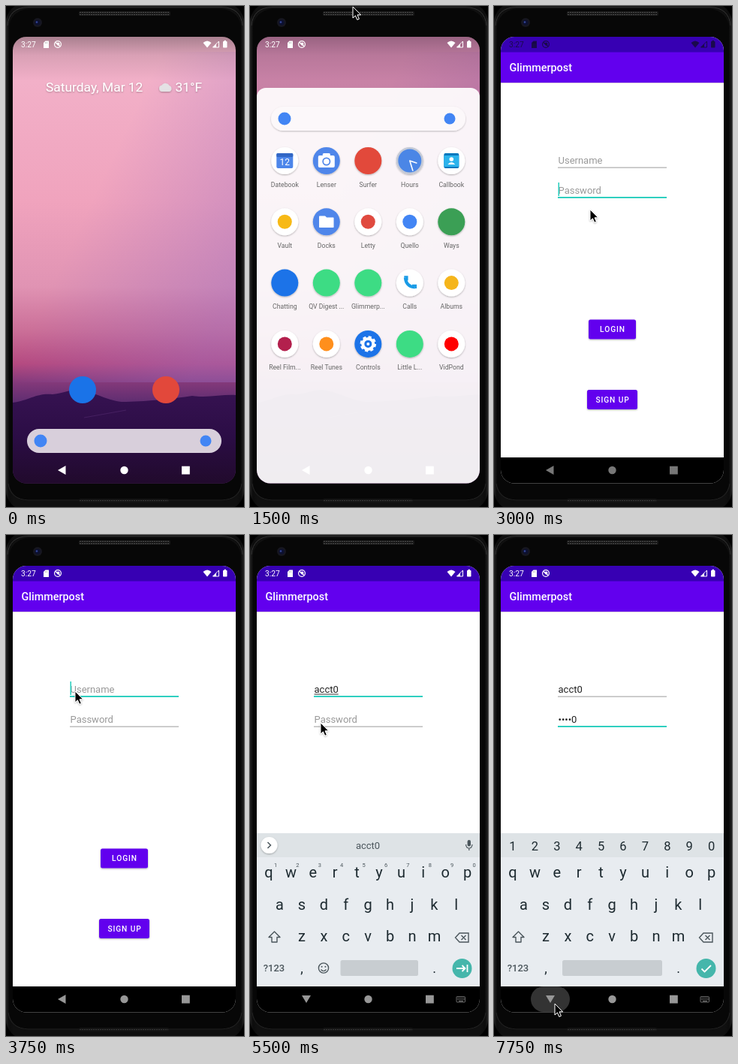
Write an HTML page that moves like this. It is 317x667 px and loops after 8 s.

```html
<!DOCTYPE html>
<html lang="en">
<head>
<meta charset="utf-8">
<title>Login demo</title>
<style>
html, body { margin: 0; width: 100%; height: 100%; overflow: hidden; background: #000; }
svg { display: block; width: 317px; height: 667px; font-family: Roboto, sans-serif; }
</style>
</head>
<body>
<svg id="stage" viewBox="0 0 317 667">
  <defs>
    <clipPath id="screen"><rect x="9" y="41" width="297" height="594.5" rx="18"/></clipPath>
    <linearGradient id="body" x2="1" y2="0">
      <stop offset="0" stop-color="#222"/><stop offset=".012" stop-color="#0c0c0c"/>
      <stop offset=".03" stop-color="#101010"/><stop offset=".97" stop-color="#101010"/>
      <stop offset=".988" stop-color="#0c0c0c"/><stop offset="1" stop-color="#222"/>
    </linearGradient>
    <linearGradient id="sky" gradientUnits="userSpaceOnUse" x1="0" y1="41" x2="0" y2="530">
      <stop offset="0" stop-color="#a9808f"/><stop offset=".05" stop-color="#d9a0b5"/>
      <stop offset=".12" stop-color="#f2b0c8"/><stop offset=".45" stop-color="#f0a3bd"/>
      <stop offset=".68" stop-color="#e093b3"/><stop offset=".8" stop-color="#cb6f98"/>
      <stop offset=".89" stop-color="#b54a80"/><stop offset=".94" stop-color="#84397a"/>
      <stop offset="1" stop-color="#5b2c70"/>
    </linearGradient>
    <linearGradient id="haze" x2="1" y2=".7">
      <stop offset=".45" stop-color="#9a6cc0" stop-opacity="0"/><stop offset="1" stop-color="#9a6cc0" stop-opacity=".42"/>
    </linearGradient>
    <linearGradient id="hill" x2="0" y2="1">
      <stop offset="0" stop-color="#371252"/><stop offset=".5" stop-color="#2b0d45"/><stop offset="1" stop-color="#210a2c"/>
    </linearGradient>
    <filter id="soft" x="-30%" y="-30%" width="160%" height="160%">
      <feDropShadow dx="0" dy="1" stdDeviation=".8" flood-color="#000" flood-opacity=".3"/>
    </filter>
  </defs>
  <g id="device"></g>
  <g id="view" clip-path="url(#screen)"></g>
  <g id="pointer"></g>
</svg>
<script>
const STEP = 250, STEPS = 32;
const $ = id => document.getElementById(id);
const clamp = (v, lo = 0, hi = 1) => Math.min(hi, Math.max(lo, v));
const times = (n, f) => Array.from({ length: n }, (_, i) => f(i)).join('');

// drawing helpers
const rect = (x, y, w, h, fill, more = '') => `<rect x="${x}" y="${y}" width="${w}" height="${h}" fill="${fill}" ${more}/>`;
const disc = (x, y, r, fill, more = '') => `<circle cx="${x}" cy="${y}" r="${r}" fill="${fill}" ${more}/>`;
const shape = (d, fill, more = '') => `<path d="${d}" fill="${fill}" ${more}/>`;
const line = (d, color, w = 1.4, more = '') => shape(d, 'none', `stroke="${color}" stroke-width="${w}" ${more}`);
const text = (x, y, size, fill, s, more = '') => `<text x="${x}" y="${y}" font-size="${size}" fill="${fill}" ${more}>${s}</text>`;
const mid = (x, y, size, fill, s, more = '') => text(x, y, size, fill, s, `text-anchor="middle" ${more}`);
const group = (inner, more) => `<g ${more}>${inner}</g>`;
const at = (x, y, inner) => group(inner, `transform="translate(${x} ${y})"`);

const pen = document.createElement('canvas').getContext('2d');
const widthOf = (s, size) => { pen.font = `${size}px Roboto, sans-serif`; return pen.measureText(s).width; };

// pointer path: step, x, y
const PATH = [[1, 140, 250], [2, 140, 226], [3, 139, 160], [4, 138, 60], [5, 137, 2], [6, 137, 1], [7, 139, 40],
  [8, 142, 150], [9, 145, 270], [10, 146, 306], [11, 143, 304], [12, 128, 271], [13, 110, 240], [14, 94, 210],
  [15, 92, 208], [20, 92, 208], [21, 93, 235], [22, 94, 250], [28, 94, 250], [29, 90, 400], [30, 81, 612], [31, 81, 624]];

function pointerAt(k) {
  const i = PATH.findIndex(p => p[0] >= k), b = PATH[i], a = PATH[Math.max(0, i - 1)];
  const f = b[0] === a[0] ? 1 : (k - a[0]) / (b[0] - a[0]);
  return [a[1] + (b[1] - a[1]) * f, a[2] + (b[2] - a[2]) * f];
}

const glyphs = {
  dot: c => disc(0, 0, 9.5, c),
  day: () => rect(-11, -10, 22, 20, '#4d86ea', 'rx="2"') + rect(-11, -10, 22, 5, '#3267c5', 'rx="1.5"') + mid(0, 6, 12, '#fff', '12'),
  lens: () => rect(-11, -7, 22, 16, '#fff', 'rx="2"') + rect(-5, -10, 10, 5, '#fff', 'rx="1.5"') + disc(0, 1, 5.5, '#4f86ea') + disc(0, 1, 3.8, '#fff'),
  dial: () => disc(0, 0, 15.5, '#4b86e6') + line('M0 0L4 13M0 0L9 3', '#fff', 1.6, 'stroke-linecap="round"'),
  person: () => rect(-10, -10, 20, 20, '#0277bd', 'rx="2"') + rect(-10, -7, 20, 15, '#2bb3ec') + disc(0, -2, 2.8, '#fff') + shape('M-5 5Q0 -1 5 5Z', '#fff'),
  folder: () => shape('M-9 -7H-2L0 -5H9V7H-9Z', '#fff', 'stroke="#fff" stroke-width="1.5" stroke-linejoin="round"'),
  handset: () => line('M-6 -7Q-5 5 7 6', '#1a9be6', 4) + line('M-7.5 -8H-3.5V-3M8 7.5V3.5H3', '#1a9be6', 2.5),
  gear: () => disc(0, 0, 7, 'none', 'stroke="#fff" stroke-width="4"') + disc(0, 0, 9.5, 'none', 'stroke="#fff" stroke-width="2.5" stroke-dasharray="4.2 3.26"') + disc(0, 0, 2, '#fff')
};
const WHITE = '#fff', GREEN = '#3ddc84', BLUE = '#4f86ea';
const APPS = [
  ['Datebook', WHITE, 'day'], ['Lenser', BLUE, 'lens'], ['Surfer', '#e2483b'], ['Hours', '#c3c9d6', 'dial'], ['Callbook', WHITE, 'person'],
  ['Vault', WHITE, 'dot', '#f7b916'], ['Docks', BLUE, 'folder'], ['Letty', WHITE, 'dot', '#e04a3f'], ['Quello', WHITE, 'dot', '#4285f4'], ['Ways', '#3a9f55'],
  ['Chatting', '#1a73e8'], ['QV Digest ...', GREEN], ['Glimmerp...', GREEN], ['Calls', WHITE, 'handset'], ['Albums', WHITE, 'dot', '#f5b51b'],
  ['Reel Film...', WHITE, 'dot', '#b3204d'], ['Reel Tunes', WHITE, 'dot', '#ff8f1c'], ['Controls', '#1a73e8', 'gear'], ['Little L...', GREEN], ['VidPond', WHITE, 'dot', '#f00']
];

function device() {
  return rect(0, 0, 317, 667, '#000') + rect(0, -4, 317, 675, 'url(#body)', 'rx="26"')
    + rect(4, 4, 309, 655, '#070707', 'rx="26"') + line('M2 26Q4 2 30 1.5H287Q313 2 315 26', '#333', 1)
    + line('M3 636Q6 657 30 658H287Q311 657 314 636', '#242424', 1)
    + rect(97, 7, 122, 6, '#191919', 'rx="2"') + line('M98 8.5H218M98 11.5H218', '#4a4a4a', 1, 'stroke-dasharray="2 1"')
    + rect(97, 656, 120, 5, '#151515', 'rx="2"') + line('M98 658.5H216', '#393939', 1, 'stroke-dasharray="2 1"')
    + disc(42, 22, 6, '#171720') + disc(42, 22, 3.5, '#0c1030') + disc(41, 21.5, 1.3, '#36479a');
}

function statusBar(c) {
  return text(20, 55, 10.3, c, '3:27')
    + shape('M52.5 46.5H57V56H50V49Z', c) + line('M52.5 48V50M54.5 48V50', '#0005', .8)
    + disc(69, 51, 4.4, 'none', `stroke="${c}" stroke-width="1.2"`) + line('M66 48.5L72 53.5', c, 1.6) + disc(69.5, 50.5, 1.9, c)
    + shape('M262.5 49Q268 44 273.5 49L268 55.5Z', c)
    + line('M275.5 55L283.5 47V55Z', c, 1) + shape('M275.5 55L280 50.5V55Z', c)
    + rect(289, 47, 5.5, 8.5, c, 'rx=".8"') + rect(290.5, 45.8, 2.5, 1.5, c);
}

function navBar(c, keys) {
  const back = keys ? 'M69 613H81L75 623Z' : 'M79.5 612V624L69 618Z';
  const board = keys ? rect(275, 614.5, 11.5, 7.5, 'none', `stroke="${c}" stroke-width=".7" rx="1"`)
    + line('M276.5 616.5H285.5M276.5 618.5H285.5', c, 1, 'stroke-dasharray="1 1"') + line('M278 620.6H284', c, .9) : '';
  return shape(back, c) + disc(157.5, 618, 5.2, c) + rect(234, 612.7, 10.8, 10.8, c) + board;
}

function launcher(k) {
  const y = k === 0 ? 579 : k <= 5 ? 579 - 239 * (250 - pointerAt(k)[1]) / 248 : k === 6 ? 150 : 89;
  const p = (579 - y) / 490, open = p >= 1, home = clamp(1 - p * 3.5);
  const wall = rect(9, 41, 297, 595, 'url(#sky)') + rect(9, 61, 297, 440, 'url(#haze)')
    + shape('M9 528C32 525 40 515 62 517C78 515 84 511 96 511C118 513 138 528 160 527C192 526 222 523 248 519C270 522 287 517 306 518V636H9Z', 'url(#hill)')
    + line('M104 548L160 538', '#50286a', .7)
    + rect(9, 41, 297, 595, '#7c2f69', `opacity="${clamp(p * .72, 0, .36)}"`);
  const widget = text(53, 114, 17.4, '#fff', 'Saturday, Mar 12') + text(225.5, 114, 17.4, '#fff', '31°F')
    + shape('M208 114A4.3 4.3 0 0 1 207.5 105.5A5.8 5.8 0 0 1 217.5 106A4.2 4.2 0 0 1 217.5 114Z', '#e4e1e4');
  const dock = disc(102, 511, 18, '#1a73e8') + disc(213, 511, 18, '#e2483b');
  const icons = APPS.map(([name, bg, kind, color], i) => {
    const pressed = i === 12 && k === 10;
    const art = disc(0, 0, pressed ? 20 : 18, bg, 'filter="url(#soft)"') + (kind ? glyphs[kind](color) : '');
    return at(46.3 + i % 5 * 55.5, y + 56 + Math.floor(i / 5) * 81.3, art + mid(0, 34.5, 8.7, '#666', name));
  }).join('');
  const top = open ? 30 : y - 41;
  return wall + group(widget, `opacity="${home}" filter="url(#soft)"`) + group(dock, `opacity="${home}"`)
    + rect(9, top, 297, 660, '#fff', `rx="${open ? 0 : 12}" opacity="${clamp(p * 1.9, 0, .92)}"`)
    + rect(28, y - 16, 259, 32, p > .1 ? '#fdf9fb' : '#d8cfdb', `rx="16" ${p > .1 ? 'filter="url(#soft)" opacity=".8"' : ''}`)
    + disc(46, y, 8.5, '#4285f4') + disc(266, y, 7.5, '#4285f4')
    + group(icons, `opacity="${clamp((p - .1) * 1.55)}"`)
    + (open ? rect(9, 601, 297, 35, '#f6f6f9', 'opacity=".8"') : '')
    + statusBar(open ? '#66636a' : '#fff') + navBar(open ? '#5f5f63' : '#fff');
}

const LOGIN_ID = 'acct0', SECRET = 'pass0';
const SUGGEST = ['', 'ac,acc,at', 'acc,acct,act', 'acct,accts,act'];
const EDITS = [12, 15, 17, 18, 19, 20, 24, 25, 26, 27, 28, 29];

function field(y, value, hint, focused, caret, underline) {
  const w = widthOf(value, 13);
  return text(85.5, y, 13, value ? '#222' : '#999', value || hint)
    + (underline ? rect(85.5, y + 1.5, w, 1, '#333') : '')
    + (focused ? rect(85, y + 4, 145, 1.9, '#25cdbd') : rect(85, y + 4.6, 145, 1, '#9b9b9b'))
    + (caret ? rect(85.5 + w, y - 15, 1.5, 18, '#25cdbd') : '');
}

function button(x, y, w, label) {
  return rect(x, y, w, 26, '#6200ee', 'rx="2.5" filter="url(#soft)"')
    + mid(x + w / 2 + .5, y + 16.8, 10.2, '#fff', label, 'font-weight="500" letter-spacing=".9"');
}

function keyboard(k, secret) {
  const ink = '#1d2a30', soft = '#4b565c';
  const row = (keys, x, y) => [...keys].map((c, i) => mid(x + i * 29.4, y, 20, ink, c)).join('');
  let out = rect(9, 397, 297, 204, '#e8ecf0') + rect(9, 397, 297, 32, '#dee3e6')
    + row('qwertyuiop', 25, 456) + row('asdfghjkl', 39.5, 499) + row('zxcvbnm', 69, 541)
    + line('M32.5 528L40 535.5H36V542H29V535.5H25Z', soft, 1.4, 'stroke-linejoin="round"')
    + line('M279 530H291V542H279L273.5 536Z M281.5 533L287.5 539M287.5 533L281.5 539', soft, 1.4)
    + mid(32, 581, 13, soft, '?123', 'font-weight="500"') + mid(69, 583, 18, ink, ',') + mid(245.5, 583, 18, ink, '.')
    + rect(secret ? 91 : 120.5, 566, secret ? 133 : 103.5, 21, '#c8cdd1', 'rx="2.5"') + disc(282.5, 577, 13, '#45b6ab');
  if (secret) {
    return out + times(10, i => mid(25 + i * 29.4, 419.5, 16.5, ink, (i + 1) % 10))
      + line('M276.5 577.5L280.5 581.5L289 573', '#fff', 1.8);
  }
  out += times(10, i => mid(34 + i * 29.4, 441.5, 7.5, soft, (i + 1) % 10))
    + disc(98, 576.5, 6.6, 'none', `stroke="${soft}" stroke-width="1.4"`) + disc(95.6, 574.8, 1, soft) + disc(100.4, 574.8, 1, soft)
    + line('M94.5 578.5Q98 582.5 101.5 578.5', soft, 1.2)
    + line('M275 577H286M282.5 573L286.5 577L282.5 581M289.5 572V582', '#fff', 1.8)
    + disc(25.5, 413, 11, '#fff', 'filter="url(#soft)"') + line('M23.5 409L27.5 413L23.5 417', soft, 1.5)
    + rect(289.6, 406, 4.4, 8.5, soft, 'rx="2.2"') + line('M287.5 412Q288 417 291.8 417T296 412M291.8 416.5V420', soft, 1.2);
  if (k >= 20) return out + mid(157, 418, 13, soft, LOGIN_ID);
  const words = SUGGEST[k - 16].split(',');
  return out + (words[0] ? words.map((s, i) => mid(74 + i * 82, 418, 13, soft, s)).join('') + rect(113, 405, 1, 17, '#c3c9cd') + rect(200, 405, 1, 17, '#c3c9cd') : '');
}

function app(k) {
  const onName = k >= 15 && k < 24, typing = k >= 16, secret = k >= 24;
  const name = LOGIN_ID.slice(0, k < 17 ? 0 : clamp(k - 15, 2, 5));
  const count = clamp(k - 24, 0, 5);
  const masked = count ? '•'.repeat(count - 1) + SECRET[count - 1] : '';
  const last = EDITS.filter(e => e <= k).pop() || k;
  const caret = (k - last) % 4 < 2;
  const ripple = k === 31 ? rect(49, 601, 52, 34, '#333', 'rx="17"') : '';
  return rect(9, 41, 297, 595, '#fff') + rect(9, 102, 297, 1, '#d9d6de')
    + rect(9, 61, 297, 41, '#6200ee') + rect(9, 41, 297, 20.5, '#3700b3')
    + text(20.5, 87, 14.4, '#fff', 'Glimmerpost', 'font-weight="500"')
    + field(210, name, 'Username', onName, onName && caret, onName && name)
    + field(250, masked, 'Password', !onName, !onName && caret)
    + button(126, 417.5, 63, 'LOGIN') + button(124, 511, 67, 'SIGN UP')
    + (typing ? keyboard(k, secret) : '')
    + rect(9, 601, 297, 35, '#000') + ripple
    + statusBar(k <= 12 ? '#1a0a4c' : '#fff') + navBar(k <= 12 ? '#777' : '#979797', typing);
}

function view(k) {
  if (k < 11) return launcher(k);
  if (k === 11) return launcher(k) + group(app(k), 'opacity=".9" transform="translate(157 308) scale(.86) translate(-157 -308)"');
  return app(k);
}

function pointer(k) {
  if (!k) return '';
  const [x, y] = pointerAt(k);
  return at(x, y, shape('M0 0V15L3.4 11.8L5.8 17.3L8.4 16.2L6 10.8H10.7Z', '#000', 'stroke="#fff" stroke-width="1" filter="url(#soft)"'));
}

$('device').innerHTML = device();
const start = performance.now();
let shown = -1;
function tick() {
  const k = Math.floor((performance.now() - start) / STEP) % STEPS;
  if (k !== shown) {
    $('view').innerHTML = view(k);
    $('pointer').innerHTML = pointer(k);
    shown = k;
  }
  requestAnimationFrame(tick);
}
tick();
</script>
</body>
</html>
```
